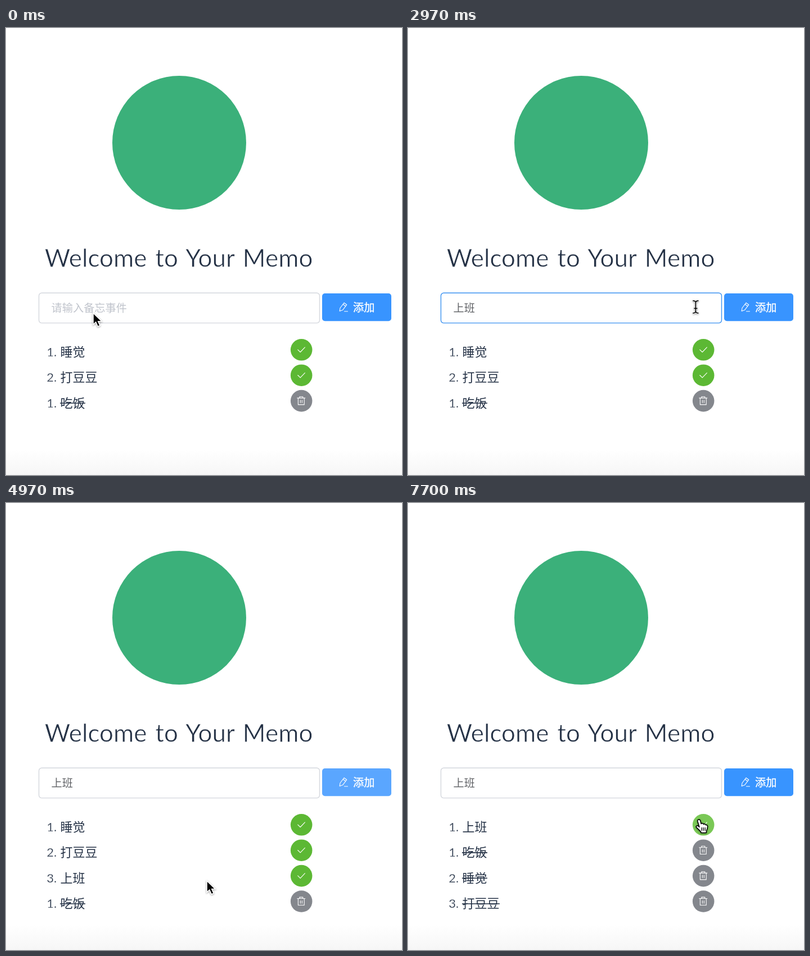
Recreate the animation shown at these times as an HTML page. Size 704 by 795 pixels, loop 8000 ms.

```html
<!DOCTYPE html>
<html lang="zh-CN">
<head>
<meta charset="utf-8">
<title>Memo</title>
<style>
  html, body { margin: 0; width: 100%; height: 100%; overflow: hidden; background: #fff; }
  svg { display: block; width: 100%; height: 100%; }
  text { font-family: "Noto Sans CJK SC", "Noto Sans CJK", sans-serif; white-space: pre; }
  /* A white outline thins the strokes of the Latin type */
  .title, .num { font-family: Lato, sans-serif; fill: #253246; stroke: #fff; }
  .title { font-size: 44px; word-spacing: 3.5px; stroke-width: .8; }
  .num { stroke-width: .35; }
  .num, .item { font-size: 22px; }
  .item { fill: #253246; }
  .field { font-size: 19.2px; font-family: "Liberation Sans", "Noto Sans CJK SC", "Noto Sans CJK", sans-serif; fill: #606266; }
  .hint { fill: #c0c4cc; }
  .add { font-size: 19.2px; font-weight: 500; fill: #fff; stroke: #fff; stroke-width: .4; }
  .key { font: 17px "Liberation Sans", sans-serif; fill: #858585; }
  .cand { font-size: 22px; fill: #000; }
  .line { fill: none; stroke: #fff; stroke-width: 1.1; stroke-linecap: round; stroke-linejoin: round; }
  #popup { filter: drop-shadow(0 5px 7px #0006) drop-shadow(0 0 1px #0007); }
  #cursor { filter: drop-shadow(0 1.5px 1.5px #0006); }
</style>
</head>
<body>
<svg viewBox="0 0 704 795">
  <defs>
    <linearGradient id="floor" x2="0" y2="1">
      <stop stop-color="#fff"/><stop offset="1" stop-color="#f6f6f6"/>
    </linearGradient>
    <linearGradient id="tile" x2="0" y2="1">
      <stop stop-color="#8fa9c4"/><stop offset="1" stop-color="#43658a"/>
    </linearGradient>
    <path id="check" class="line" d="M518.8 -.2l4.4 4.4 8.2-8.6"/>
    <path id="trash" class="line" d="M517.8 -5h14M521.8 -5v-2.4h6v2.4M519.4 -5v11.8h10.8v-11.8M523.3 -1.2v4.6M526.3 -1.2v4.6"/>
    <path id="arrow" d="M0 0V20.5L4.7 16.2 8.2 24 12.2 22.3 8.8 14.7H15.3Z" stroke="#fff" stroke-width="1.6"/>
    <path id="stem" d="M-5 -11C-2 -11 0 -10 0 -7.5C0 -10 2 -11 5 -11M0 -8V8M-5 11C-2 11 0 10 0 7.5C0 10 2 11 5 11M-3 2.5H3"/>
    <g id="beam" fill="none">
      <use href="#stem" stroke="#fff" stroke-width="3.4"/>
      <use href="#stem" stroke="#000" stroke-width="1.7"/>
    </g>
    <g id="hand" stroke="#000" stroke-linecap="round" stroke-linejoin="round">
      <path fill="#fff" stroke-width="1.6" d="M-2.2 3.4C-2.8 .2 1.7 -.8 2.7 2.4L4.2 8C5.2 6.6 8 7 8.6 9C9.8 7.8 12 8.3 12.6 10.2C14.2 9.6 15.8 10.8 15.6 13C15.4 17 14.4 18.5 13.6 20.2L13.3 24H4L3.5 22C1 20 -1 17 -4.2 14.6C-5.8 12.4 -3 10.4 -1 12L.9 13.8Z"/>
      <path fill="none" stroke-width="1.3" d="M5.2 15v5M8.2 15v5M11.2 15v5"/>
    </g>
  </defs>

  <rect y="750" width="704" height="45" fill="url(#floor)"/>
  <circle cx="308" cy="204" r="119" fill="#3bb07a"/>
  <text class="title" x="68.8" y="425">Welcome to Your Memo</text>

  <rect id="input" x="58.5" y="471.2" width="499" height="53.4" rx="5" fill="#fff" stroke-width="1.4"/>
  <text id="typed" class="field" x="80.6" y="504.8"></text>
  <path id="underline" stroke="#606266" stroke-width="1.4"/>
  <path id="caret" stroke="#222" stroke-width="1.3"/>

  <rect id="button" x="562" y="472" width="123" height="49.3" rx="5"/>
  <path class="line" d="M593.2 503.6l.8-5.6 7-9.2 4.8 3.4-7 9.2zM599 491.3l4.8 3.4M601.5 504h6"/>
  <text class="add" x="617" y="504">添加</text>

  <g id="list"></g>
  <g id="popup">
    <rect x="57.5" y="518.5" width="541" height="37.3" rx="5" fill="#fff"/>
    <g id="cands"></g>
    <path d="M573.5 534.5l6 5.5 6-5.5" fill="none" stroke="#777" stroke-width="2" stroke-linecap="round"/>
  </g>
  <use id="cursor"/>
</svg>
<script>
const LOOP = 8000;
const $ = id => document.getElementById(id);
const last = (steps, t) => steps.filter(s => s[0] <= t).pop();

// Linear interpolation through [time, ...values] points
function track(points, t) {
  const i = points.findIndex(p => p[0] > t);
  if (i < 0) return points[points.length - 1].slice(1);
  if (i === 0) return points[0].slice(1);
  const a = points[i - 1], b = points[i], k = (t - a[0]) / (b[0] - a[0]);
  return a.slice(1).map((v, j) => v + (b[j + 1] - v) * k);
}
const rgb = (points, t) => `rgb(${track(points, t).map(Math.round)})`;

const BLUE = [56, 148, 255], BLUE_HOVER = [90, 166, 255], BLUE_DOWN = [66, 144, 238];
const GREEN = [92, 184, 52], GREEN_HOVER = [122, 200, 86], GREEN_DOWN = [84, 165, 48];
const BORDER = [212, 215, 221], BORDER_FOCUS = [58, 145, 240];

// Turns [start, colour] changes into short fades
const fades = (first, changes, ms) => {
  let prev = first;
  return [[0, ...first]].concat(changes.flatMap(([at, c]) => {
    const pair = [[at, ...prev], [at + ms, ...c]];
    prev = c;
    return pair;
  }));
};
const buttonFill = fades(BLUE, [[3100, BLUE_HOVER], [3460, BLUE_DOWN], [3680, BLUE_HOVER], [6180, BLUE]], 100);
const checkFill = fades(GREEN, [[5760, GREEN_HOVER], [6180, GREEN_DOWN], [6290, GREEN_HOVER],
  [7300, GREEN_DOWN], [7410, GREEN_HOVER]], 100);
const borderFill = fades(BORDER, [[700, BORDER_FOCUS], [3570, BORDER]], 170);

const path = [[0, 155, 507], [300, 155, 507], [600, 215, 500], [1000, 300, 498], [2800, 300, 499],
  [2970, 511, 496], [3120, 572, 503], [3400, 608, 507], [4330, 608, 507], [4500, 560, 560],
  [4800, 380, 664], [4970, 357, 672], [5130, 358, 648], [5350, 385, 628], [5600, 475, 588],
  [5850, 517, 565], [5970, 518.5, 562.5], [6630, 518.5, 562.5], [6730, 511.5, 562.5], [6830, 517, 562.5]];
const shapes = [[0, 'arrow'], [300, 'beam'], [1150, ''], [2800, 'beam'], [3100, 'hand'],
  [4400, 'arrow'], [5760, 'hand']];

const SHANG = '上 ⬆ 伤 尚 商 赏 殇 裳 墒', SHANGBAN = '上班 上半 上板 上般 上版 伤斑';
const typing = [[0, '', ''], [1150, 's', '是 上 说 三 四 所 岁 算 送'], [1290, 'sh', '是 上 时 事 使 市 十 说 生'],
  [1430, 'sha', '啥 沙 杀 傻 纱 莎 煞 砂 刹'], [1600, 'shan', SHANG], [1970, 'shang', SHANG],
  [2100, 'shang b', '上班 上边 上部 上半 上报 伤病'], [2230, 'shang ba', '上班 上把 上吧 上半 上巴 上爸'],
  [2360, 'shang ban', SHANGBAN], [2600, '上班', '']];

const lists = [[0, ['睡觉', '打豆豆'], ['吃饭']],
  [3690, ['睡觉', '打豆豆', '上班'], ['吃饭']],
  [6280, ['打豆豆', '上班'], ['吃饭', '睡觉']],
  [7400, ['上班'], ['吃饭', '睡觉', '打豆豆']]];

function row(label, number, index, done) {
  const y = 572.3 + 45.4 * index;
  const strike = done ? `<path d="M96 ${y + 4.2}h${label.length * 22 + 1}" stroke="#253246" stroke-width="1.6"/>` : '';
  return `<text class="num" x="72.2" y="${y + 11.5}">${number}.</text>
    <text class="item" x="96.5" y="${y + 11.5}">${label}</text>${strike}
    <circle cx="525.2" cy="${y}" r="19.3" fill="${done ? '#84878d' : `rgb(${GREEN})`}"/>
    <use href="#${done ? 'trash' : 'check'}" y="${y}"/>`;
}

function candidates(words) {
  let x = 62, out = '';
  words.split(' ').forEach((word, i) => {
    const wide = word.length * 22, emoji = word === '⬆';
    if (!i) out += `<rect x="62.5" y="523" width="${22 + wide}" height="28" rx="4" fill="#cfe6ff" stroke="#90c3fb"/>`;
    out += `<text class="key" x="${x + 3.5}" y="542.3">${i + 1}</text>`;
    out += emoji
      ? `<rect x="${x + 19}" y="522" width="27" height="27" rx="4" fill="url(#tile)"/>
         <path d="M${x + 32.5} 526l8 9h-4.5v10h-7v-10h-4.5z" fill="#fff"/>`
      : `<text class="cand" x="${x + 17.5}" y="545.3">${word}</text>`;
    x += 31.6 + wide + (emoji ? 8 : 0);
  });
  return out;
}

let shownList, shownTyping;
function render(t) {
  const list = last(lists, t), typed = last(typing, t);
  if (list !== shownList) {
    shownList = list;
    const [, todo, done] = list;
    $('list').innerHTML = todo.map((s, i) => row(s, i + 1, i, false)).join('') +
      done.map((s, i) => row(s, i + 1, todo.length + i, true)).join('');
  }
  const [since, text, words] = typed;
  if (typed !== shownTyping) {
    shownTyping = typed;
    $('typed').textContent = text || '请输入备忘事件';
    $('typed').classList.toggle('hint', !text);
    $('popup').style.display = words ? '' : 'none';
    $('cands').innerHTML = words && candidates(words);
  }
  const width = text ? $('typed').getComputedTextLength() : 0;
  $('underline').setAttribute('d', words ? `M81 508.3h${width}` : 'M0 0');
  const blinkStart = text === '上班' ? 2450 : Math.max(since, 700);
  const caretOn = t >= 700 && t < 3520 && (words || (t - blinkStart) % 1000 < 500);
  $('caret').setAttribute('d', caretOn ? `M${82 + width} 486v23` : 'M0 0');

  $('input').setAttribute('stroke', rgb(borderFill, t));
  $('button').setAttribute('fill', rgb(buttonFill, t));
  $('list').querySelector('circle').setAttribute('fill', rgb(checkFill, t));

  const [x, y] = track(path, t), shape = last(shapes, t)[1];
  $('cursor').setAttribute('href', '#' + shape);
  $('cursor').style.display = shape ? '' : 'none';
  $('cursor').setAttribute('transform', `translate(${x} ${y})`);
}

function frame() {
  render(performance.now() % LOOP);
  requestAnimationFrame(frame);
}
frame();
</script>
</body>
</html>
```
